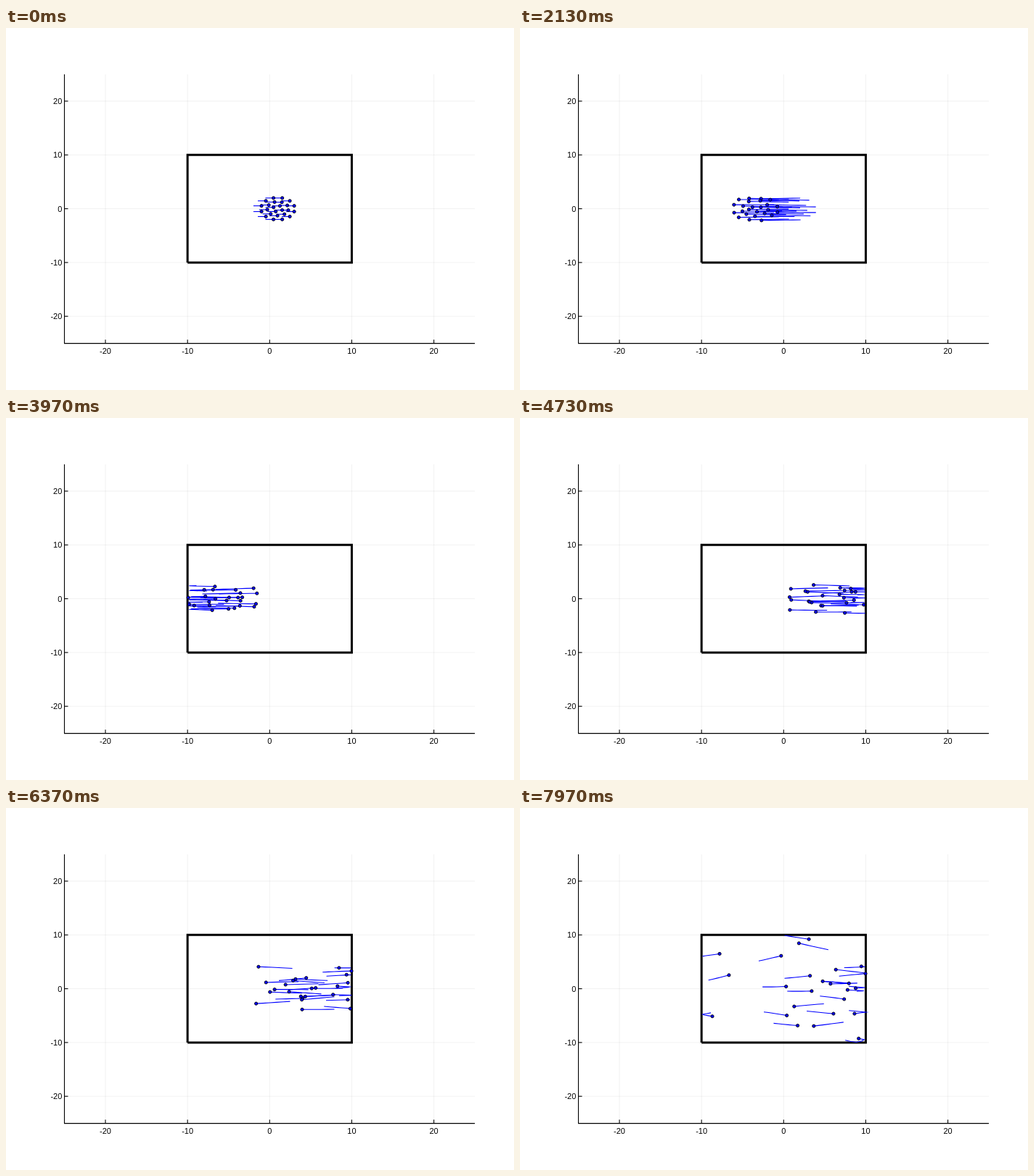
Write an HTML page with a canvas that moves like this. It is 700 px wide and 500 px high and loops after 8 s.

```html
<!DOCTYPE html>
<html lang="en">
<head>
<meta charset="utf-8">
<title>Particles in a box</title>
<style>
html, body { margin: 0; width: 100%; height: 100%; overflow: hidden; background: #fff; }
canvas { display: block; }
</style>
</head>
<body>
<canvas id="stage" width="700" height="500"></canvas>
<script>
const ctx = document.getElementById('stage').getContext('2d');
const LOOP = 8000, STEPS = 240, STEP = LOOP / STEPS, TRAIL = 5;
const toX = x => 363.3 + x * 11.315;
const toY = y => 249.6 - y * 7.43;

let seed = 7;
function random() {
  seed = (seed * 16807) % 2147483647;
  return seed / 2147483647;
}
// Bell-shaped value between -1.5 and 1.5.
const deviation = () => random() + random() + random() - 1.5;

function ring(count, radius, firstAngle) {
  return Array.from({ length: count }, (_, i) => {
    const angle = (firstAngle + i * 360 / count) * Math.PI / 180;
    return {
      dx: radius * Math.cos(angle),
      dy: radius * Math.sin(angle),
      driftX: deviation(),
      driftY: deviation(),
      phase: random() * 2 * Math.PI
    };
  });
}
const particles = [...ring(12, 2.06, 15), ...ring(9, 1.3, -12), ...ring(4, 0.58, -26)];

// Reflects an unbounded coordinate between the walls at -10 and 10.
function fold(u) {
  const m = (((u + 10) % 40) + 40) % 40;
  return m < 20 ? m - 10 : 30 - m;
}

// The cluster flies right, gradually slows down and disperses.
function position(p, step) {
  const age = Math.max(0, step) / STEPS;
  const travel = 1 + 0.985 * step - 2.2e-6 * step ** 3;
  const x = travel + p.dx * (1 + 4.5 * age ** 2) + 7 * p.driftX * age ** 3;
  const y = p.dy * (1 + 0.8 * age ** 4) + 9 * p.driftY * age ** 6
    + 0.9 * age * Math.sin(0.1 * step + p.phase);
  return [toX(fold(x)), toY(fold(y))];
}

function polyline(points, color, width) {
  ctx.beginPath();
  points.forEach(([x, y]) => ctx.lineTo(x, y));
  ctx.strokeStyle = color;
  ctx.lineWidth = width;
  ctx.stroke();
}

function drawAxes() {
  const left = 80.5, right = 646, top = 64, bottom = 435.6;
  const grid = 'rgba(0,0,0,0.07)';
  const values = [-20, -10, 0, 10, 20];
  for (const v of values) {
    polyline([[toX(v), top], [toX(v), bottom]], grid, 0.8);
    polyline([[left, toY(v)], [right, toY(v)]], grid, 0.8);
  }
  polyline([[left, top], [left, bottom], [right, bottom]], '#000', 1.1);
  ctx.fillStyle = '#000';
  ctx.font = '11px "Liberation Sans", Arial, sans-serif';
  for (const v of values) {
    polyline([[toX(v), bottom], [toX(v), bottom - 5]], '#000', 1.1);
    polyline([[left, toY(v)], [left + 5, toY(v)]], '#000', 1.1);
    ctx.textAlign = 'center';
    ctx.fillText(v, toX(v), 450);
    ctx.textAlign = 'right';
    ctx.fillText(v, 77.3, toY(v) + 4);
  }
}

function drawBox() {
  const corners = [[-10, -10], [-10, 10], [10, 10], [10, -10], [-10, -10]];
  polyline(corners.map(([x, y]) => [toX(x), toY(y)]), '#000', 3);
}

function drawParticles(step) {
  const start = Math.max(-1, step - TRAIL);
  for (const p of particles) {
    const trail = [];
    for (let s = start; s <= step; s++) trail.push(position(p, s));
    polyline(trail, '#00f', 1.1);
  }
  for (const p of particles) {
    ctx.beginPath();
    ctx.arc(...position(p, step), 2.1, 0, 2 * Math.PI);
    ctx.fillStyle = '#00f';
    ctx.fill();
    ctx.strokeStyle = '#000';
    ctx.lineWidth = 0.9;
    ctx.stroke();
  }
}

function draw() {
  const time = performance.now() % LOOP;
  // Steps begin on 10 ms ticks, so a small lead keeps the rounding right.
  const step = Math.min(STEPS - 1, Math.floor((time + 3.5) / STEP));
  ctx.fillStyle = '#fff';
  ctx.fillRect(0, 0, 700, 500);
  drawAxes();
  drawBox();
  drawParticles(step);
  requestAnimationFrame(draw);
}
draw();
</script>
</body>
</html>
```
